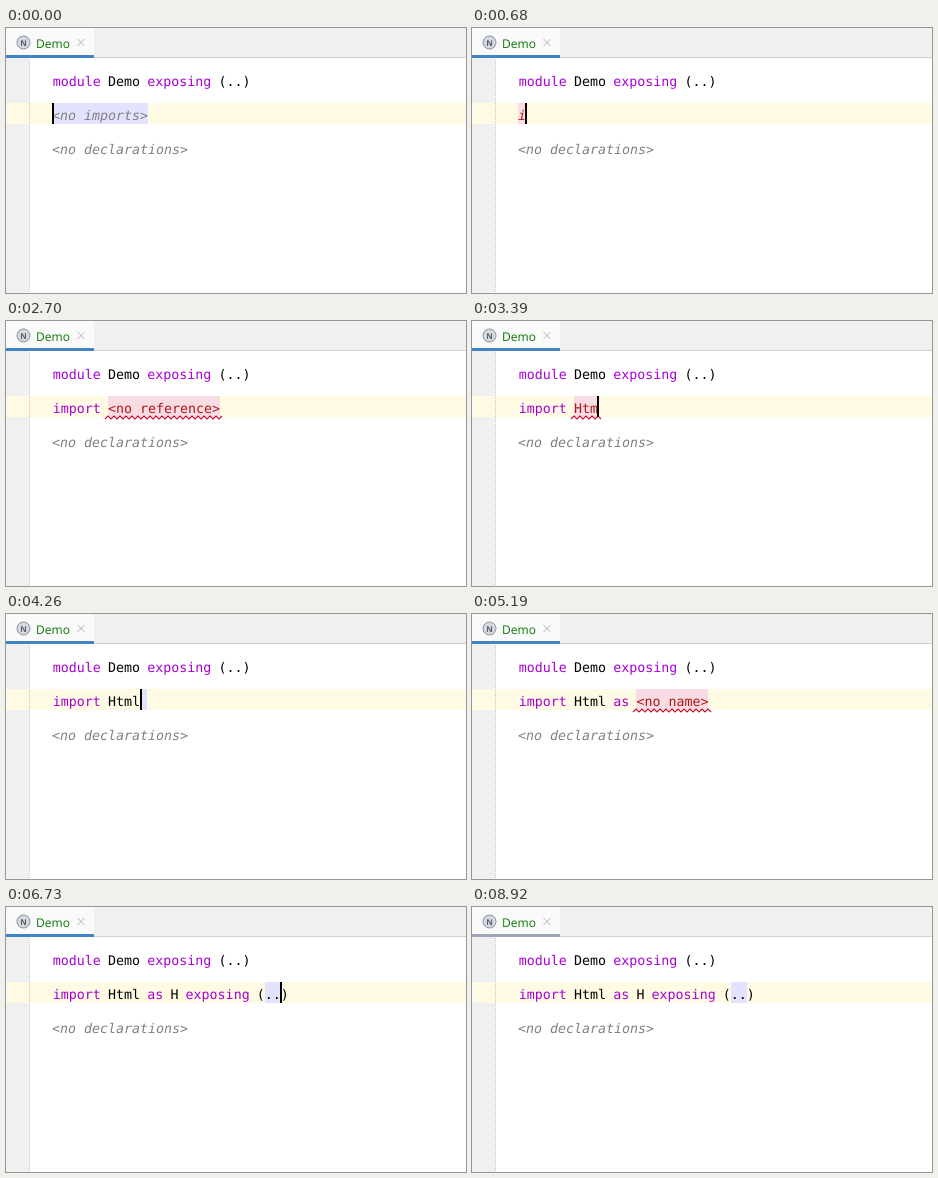
An HTML page for the animation above (8.99 s loop, 460 by 265 pixels).

```html
<!DOCTYPE html>
<html lang="en">
<head>
<meta charset="utf-8">
<title>Code editor</title>
<style>
  html, body { margin: 0; width: 100%; height: 100%; overflow: hidden; background: #fff; }
  svg { display: block; width: 460px; height: 265px; }
  text { white-space: pre; text-rendering: geometricPrecision; }
  .code { font: 13.3px "DejaVu Sans Mono", monospace; }
  .tab { font: 12px "Open Sans", sans-serif; fill: #0a7700; }
  .icon { font: bold 8px "Open Sans", sans-serif; fill: #56626c; }
  .plain { fill: #000; }
  .keyword { fill: #a900d6; }
  .hint { fill: #808080; font-style: italic; }
  .error { fill: #b01818; }
  .typing { fill: #b01818; font-style: italic; }
  .focus { fill: #e4e3ff; }
  .bad { fill: #f8dce3; }
  .wave { fill: none; stroke: #c4122f; stroke-width: 1.2; }
</style>
</head>
<body>
<svg viewBox="0 0 460 265">
  <rect width="460" height="29" fill="#f0f0f0"/>
  <rect width="88" height="29" fill="#fafafa"/>
  <rect y="29" width="460" height="1" fill="#d1d1d1"/>
  <rect id="underline" y="27" width="88" height="3"/>
  <circle cx="17.5" cy="14.5" r="6.5" fill="#d3d9de" stroke="#8a959e"/>
  <text class="icon" x="17.5" y="17.5" text-anchor="middle">N</text>
  <text class="tab" x="30" y="20">Demo</text>
  <path d="M71.5 11l7 7m0-7l-7 7" stroke="#b4b4b4" fill="none"/>
  <rect y="30" width="23" height="235" fill="#f0f0f0"/>
  <rect y="75" width="460" height="21" fill="#fffae3"/>
  <path d="M23.5 31V265" stroke="#c4c4c4" stroke-dasharray="1 1"/>
  <g id="fixed"></g>
  <g id="line"></g>
  <rect id="caret" y="75" width="2" height="21"/>
</svg>
<script>
const LOOP = 8990, FOCUS_LOST = 8920;
const LEFT = 46.8, HINT_LEFT = 46, PITCH = 8, GAP = 7.2;
const $ = id => document.getElementById(id);

// Each cell starts one gap after the end of the previous one
const after = (x, text) => x + text.length * PITCH + GAP;
const NAME = after(LEFT, "import");
const AS = after(NAME, "Html");
const ALIAS = after(AS, "as");
const EXPOSING = after(ALIAS, "H");
const PAREN = after(EXPOSING, "exposing");

const token = (x, text, kind, y = 92) =>
  `<text class="code ${kind}" x="${x.toFixed(1)}" y="${y}">${text.replace(/</g, "&lt;")}</text>`;

const box = (x, width, kind) =>
  `<rect class="${kind}" x="${Math.round(x)}" y="75" width="${width}" height="21"/>`;

const wave = (x, length) => {
  const start = Math.round(x) - 3, end = x + length * PITCH + 3;
  let d = `M${start} 98`;
  for (let i = start + 3, up = true; i <= end; i += 3, up = !up) d += `L${i} ${up ? 95 : 98}`;
  return `<path class="wave" d="${d}"/>`;
};

const cell = (x, text, kind, back) => box(x, text.length * PITCH, back) + token(x, text, kind);
const blank = x => box(x, 7, "focus");
const typing = text => cell(HINT_LEFT, text, "typing", "bad");
const importWord = token(LEFT, "import", "keyword");
const noReference = importWord + cell(NAME, "<no reference>", "error", "bad");
const badName = text => importWord + cell(NAME, text, "error", "bad") + wave(NAME, text.length);
const focusedHtml = importWord + cell(NAME, "Html", "plain", "focus");
const html = importWord + token(NAME, "Html", "plain");
const htmlAs = html + token(AS, "as", "keyword");
const noName = htmlAs + cell(ALIAS, "<no name>", "error", "bad");
const focusedAlias = htmlAs + cell(ALIAS, "H", "plain", "focus");
const alias = htmlAs + token(ALIAS, "H", "plain");
const complete = alias + token(EXPOSING, "exposing", "keyword") + token(PAREN, "(", "plain") +
  cell(PAREN + PITCH, "..", "plain", "focus") + token(PAREN + 3 * PITCH, ")", "plain");
const noImports = cell(HINT_LEFT, "<no imports>", "hint", "focus");

// Start time, line content, caret x (null while hidden)
const steps = [
  [0, noImports, 46],
  [220, noImports, null],
  [680, typing("i"), 53],
  [1140, typing("im"), 61],
  [1320, typing("imp"), 69],
  [1500, typing("impo"), 77],
  [1690, typing("impor"), 85],
  [1920, noReference, 102],
  [2320, noReference + wave(NAME, 14), 102],
  [2700, noReference + wave(NAME, 14), null],
  [2780, badName("H"), 109],
  [3310, badName("Ht"), 117],
  [3390, badName("Htm"), 125],
  [3710, focusedHtml + wave(NAME, 4), 133],
  [4010, focusedHtml, 133],
  [4260, html + blank(AS - GAP), 134],
  [4560, noName, 165],
  [4730, noName + wave(ALIAS, 9), 165],
  [5190, noName + wave(ALIAS, 9), null],
  [5570, focusedAlias + wave(ALIAS, 1), 172],
  [5800, focusedAlias, 172],
  [6200, focusedAlias, null],
  [6430, alias + blank(EXPOSING - GAP), 173],
  [6730, complete, 274],
  [7670, complete, null],
  [8130, complete, 274],
  [8680, complete, null]
];

$("fixed").innerHTML = token(LEFT, "module", "keyword", 58) + token(NAME, "Demo", "plain", 58) +
  token(AS, "exposing", "keyword", 58) + token(after(AS, "exposing"), "(..)", "plain", 58) +
  token(HINT_LEFT, "<no declarations>", "hint", 126);

const startTime = performance.now();
let shown;
function draw() {
  const time = (performance.now() - startTime) % LOOP;
  const step = steps.findLast(([at]) => at <= time);
  if (step !== shown) {
    const [, content, caretX] = shown = step;
    $("line").innerHTML = content;
    $("caret").setAttribute("visibility", caretX === null ? "hidden" : "visible");
    $("caret").setAttribute("x", caretX ?? 0);
  }
  $("underline").setAttribute("fill", time < FOCUS_LOST ? "#4083c9" : "#9ca7b8");
  requestAnimationFrame(draw);
}
draw();
</script>
</body>
</html>
```
